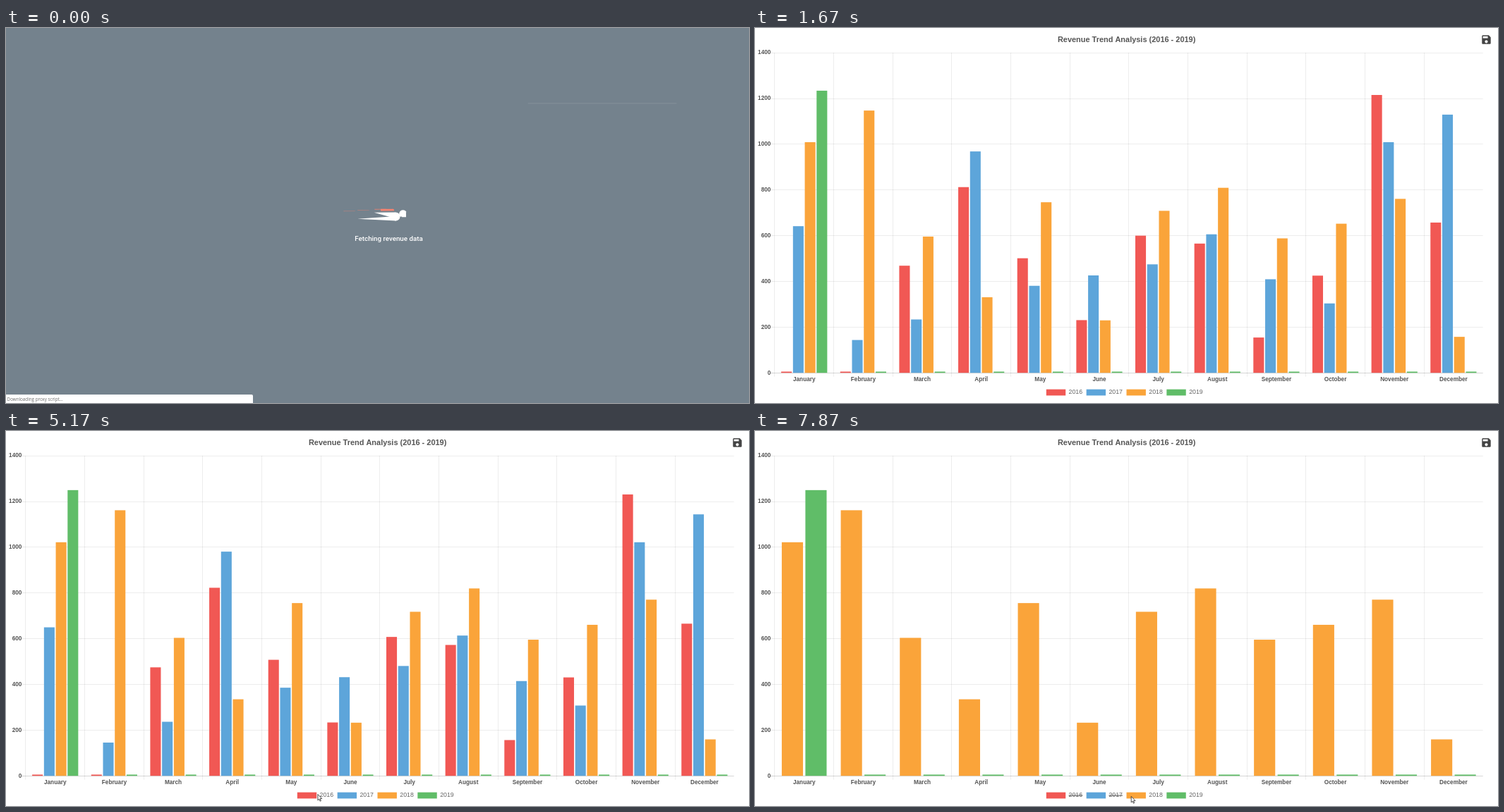
Recreate the animation shown at these times as an HTML page with a canvas. Size 1053 by 532 pixels, loop 8 s.

```html
<!DOCTYPE html>
<html lang="en">
<head>
<meta charset="utf-8">
<title>Revenue Trend Analysis</title>
<style>
html, body { margin: 0; width: 100%; height: 100%; overflow: hidden; background: #fff; }
canvas { position: absolute; left: 0; top: 0; }
</style>
</head>
<body>
<canvas id="page" width="1053" height="532"></canvas>
<canvas id="loader" width="1053" height="532"></canvas>
<script>
const page = document.getElementById('page').getContext('2d');
const loader = document.getElementById('loader').getContext('2d');
const W = 1053, H = 532, LOOP = 8000;
const UNIT = W / 1920;      // the page is drawn at this zoom
const DURATION = 730, HOVER = 290;
const CHART_START = 1185, FADE_START = 1228, FADE_TIME = 350, STATUS_END = 1000;

const LEFT = 27.9, RIGHT = 1031.7, TOP = 35.2, BASE = 489.4;
const CELL = (RIGHT - LEFT) / 12;
const SANS = '"Liberation Sans", Arial, sans-serif';
const FONT = {
  title: `bold ${20 * UNIT}px ${SANS}`,
  axis: `bold ${15 * UNIT}px ${SANS}`,
  legend: `${16 * UNIT}px ${SANS}`,
  tip: `bold ${13 * UNIT}px ${SANS}`,
  loading: `500 ${17.8 * UNIT}px Roboto, sans-serif`,
  status: '6.25px "Open Sans", sans-serif'
};
const MONTHS = ['January', 'February', 'March', 'April', 'May', 'June', 'July',
  'August', 'September', 'October', 'November', 'December'];
const SERIES = [
  { year: 2016, color: '#f15854', hover: 'hsl(2,100%,57%)',
    data: [0, 0, 475, 823, 508, 234, 608, 573, 157, 431, 1231, 666] },
  { year: 2017, color: '#5da5da', hover: 'hsl(205,94%,55%)',
    data: [650, 146, 237, 981, 386, 432, 481, 614, 415, 308, 1022, 1144] },
  { year: 2018, color: '#faa43a', hover: 'hsl(33,100%,54%)',
    data: [1022, 1162, 604, 335.37, 756, 233, 718, 820, 596, 661, 771, 160] },
  { year: 2019, color: '#60bd68', hover: 'hsl(125,62%,50%)', data: [1250] }
];

// Years shown from each time onwards
const STEPS = [
  { t: CHART_START, years: [2016, 2017, 2018, 2019] },
  { t: 5390, years: [2017, 2018, 2019] },
  { t: 5919, years: [2018, 2019] },
  { t: 6604, years: [2018] },
  { t: 7150, years: [2018, 2019] }
];

// Pointer key points: time, x, y
const PATH = [
  [1960, 126, -12], [2330, 112, 150], [2530, 112, 150], [3330, 60, 225],
  [3560, 40, 410], [4020, 321.6, 439], [4180, 338.5, 438.5], [4220, 338.5, 438.5],
  [4450, 372, 461], [5030, 441.5, 506], [5170, 441.5, 515], [5420, 441.5, 515],
  [5800, 496.3, 518.7], [6240, 496.3, 518.7], [6500, 599.3, 517],
  [7250, 599.3, 517], [7700, 532.8, 518]
];

const clamp = v => Math.max(0, Math.min(1, v));
const lerp = (a, b, p) => a + (b - a) * p;
const mix = (a, b, p) => a.map((v, i) => lerp(v, b[i], p));
const easeOut = p => 1 - Math.pow(1 - clamp(p), 4);
const value = (s, m) => SERIES[s].data[m] || 0;
const axisMax = step => Math.ceil(
  Math.max(...SERIES.filter(s => STEPS[step].years.includes(s.year)).flatMap(s => s.data)) / 200) * 200;

function text(ctx, str, x, y, font, color, align = 'left', base = 'middle') {
  ctx.font = font;
  ctx.fillStyle = color;
  ctx.textAlign = align;
  ctx.textBaseline = base;
  ctx.fillText(str, x, y);
}

function polygon(ctx, points) {
  ctx.beginPath();
  points.forEach(([x, y]) => ctx.lineTo(x, y));
  ctx.closePath();
  ctx.fill();
}

function roundRect(ctx, x, y, w, h, r) {
  ctx.beginPath();
  ctx.roundRect(x, y, w, h, r);
  ctx.fill();
}

// Column of a series inside a month cell: [left, width, pixels per unit]
function target(step, s) {
  const { years } = STEPS[step];
  const slot = CELL * 0.8 / years.length;
  const index = years.filter(y => y <= SERIES[s].year).length - 1;
  return [CELL * 0.1 + slot * (index + 0.05), slot * 0.9, (BASE - TOP) / axisMax(step)];
}

function column(step, s, t) {
  const end = target(step, s);
  const from = step ? column(step - 1, s, STEPS[step].t) : [end[0], end[1], 0];
  return mix(from, end, easeOut((t - STEPS[step].t) / DURATION));
}

// Empty bars still show a thin foot
const barHeight = (v, scale) => Math.max(v, 6) * scale;

function pointer(t) {
  const i = PATH.findIndex(p => p[0] > t);
  if (i === 0) return null;
  if (i < 0) return PATH[PATH.length - 1].slice(1);
  const a = PATH[i - 1], b = PATH[i];
  return mix(a, b, (t - a[0]) / (b[0] - a[0])).slice(1);
}

// Bar under the pointer, or null
function hit(t) {
  const p = pointer(t);
  if (!p || p[0] < LEFT || p[1] > BASE) return null;
  const m = Math.floor((p[0] - LEFT) / CELL);
  for (let s = 0; s < SERIES.length; s++) {
    const [x, w, scale] = target(0, s);
    const left = LEFT + m * CELL + x, top = BASE - barHeight(value(s, m), scale);
    if (p[0] >= left && p[0] <= left + w && p[1] >= top) return { s, m, x: left + w / 2, y: top };
  }
  return null;
}

const same = (a, b) => a === b || a && b && a.s === b.s && a.m === b.m;
const hovers = [];
for (let t = PATH[0][0], last = null; t < STEPS[1].t; t += 2) {
  const bar = hit(t);
  if (!same(bar, last)) hovers.push({ t, bar });
  last = bar;
}

// Tooltip anchor and opacity, eased from one hover to the next
function tooltip(t) {
  let view = [0, 0, 0], bar = null;
  hovers.filter(h => h.t <= t).forEach((h, i) => {
    bar = h.bar || bar;
    if (view[2] < 0.01) view = [bar.x, bar.y, 0];
    const end = Math.min(t, hovers[i + 1] ? hovers[i + 1].t : t);
    view = mix(view, [bar.x, bar.y, h.bar ? 1 : 0], easeOut((end - h.t) / HOVER));
  });
  return { bar, x: view[0], y: view[1], alpha: view[2] };
}

function drawTooltip(ctx, t) {
  const tip = tooltip(t);
  if (tip.alpha < 0.01) return;
  const { s, m } = tip.bar;
  const title = `${MONTHS[m]} ${SERIES[s].year}`, body = '$' + value(s, m).toFixed(2);
  const measure = (str, font) => { ctx.font = font; return ctx.measureText(str).width; };
  const width = Math.max(measure(title, FONT.tip), measure(body, FONT.legend)) + 12 * UNIT;
  const x = tip.x + 7 * UNIT, y = tip.y - 12.9;
  ctx.save();
  ctx.globalAlpha = tip.alpha;
  ctx.fillStyle = 'rgba(0,0,0,.8)';
  roundRect(ctx, x, y, width, 25.8, 3.3);
  polygon(ctx, [[x, tip.y - 2.7], [x - 2.7, tip.y], [x, tip.y + 2.7]]);
  text(ctx, title, x + 3.3, y + 6.9, FONT.tip, '#fff');
  text(ctx, body, x + 3.3, y + 18, FONT.legend, '#fff');
  ctx.restore();
}

function drawAxes(ctx, max) {
  const grid = (x, y, w, h, alpha) => {
    ctx.fillStyle = `rgba(0,0,0,${alpha})`;
    ctx.fillRect(Math.floor(x), Math.floor(y), w, h);
  };
  for (let v = 0; v <= max; v += 200) {
    const y = lerp(BASE, TOP, v / max);
    grid(22.5, y, RIGHT - 22, 1, v ? 0.07 : 0.16);
    text(ctx, v, 22.4, y, FONT.axis, '#555', 'right');
  }
  MONTHS.forEach((name, i) => {
    const x = LEFT + i * CELL;
    grid(x, TOP, 1, BASE - TOP + 5.5, 0.07);
    text(ctx, name, x + CELL / 2, 498.6, FONT.axis, '#555', 'center');
  });
}

function drawLegend(ctx, years) {
  SERIES.forEach((s, i) => {
    const x = 412.8 + i * 56.85;
    ctx.fillStyle = s.color;
    ctx.fillRect(x, 512.6, 27.4, 8.8);
    text(ctx, s.year, x + 31.8, 517, FONT.legend, '#666');
    if (!years.includes(s.year)) ctx.fillRect(x + 31.8, 516.5, 19.5, 1.1);
  });
}

function drawBars(ctx, step, t) {
  const hovered = hit(t);
  ctx.save();
  ctx.beginPath();
  ctx.rect(LEFT, TOP, RIGHT - LEFT, BASE - TOP);
  ctx.clip();
  SERIES.forEach(({ year, color, hover }, s) => {
    if (!STEPS[step].years.includes(year)) return;
    const [x, w, scale] = column(step, s, t);
    MONTHS.forEach((_, m) => {
      const h = barHeight(value(s, m), scale);
      ctx.fillStyle = same(hovered, { s, m }) ? hover : color;
      ctx.fillRect(LEFT + m * CELL + x, BASE - h, w, h);
    });
  });
  ctx.restore();
}

const saveIcon = new Path2D('M17 3H5c-1.11 0-2 .9-2 2v14c0 1.1.89 2 2 2h14c1.1 0 2-.9 2-2V7l-4-4z' +
  'm-5 16c-1.66 0-3-1.34-3-3s1.34-3 3-3 3 1.34 3 3-1.34 3-3 3zm3-10H5V5h10v4z');
const arrow = new Path2D('M.4 .4V8.9L2.3 7.2 3.6 10.2 4.9 9.6 3.6 6.7 6.2 6.5z');

function drawChart(ctx, t) {
  const step = STEPS.filter(s => s.t <= t).length - 1;
  text(ctx, 'Revenue Trend Analysis (2016 - 2019)', 526.6, 17, FONT.title, '#555', 'center');
  ctx.save();
  ctx.translate(1028.2, 8.3);
  ctx.scale(0.69, 0.69);
  ctx.fillStyle = '#444';
  ctx.fill(saveIcon, 'evenodd');
  ctx.restore();
  drawAxes(ctx, axisMax(step));
  drawBars(ctx, step, t);
  drawLegend(ctx, STEPS[step].years);
  drawTooltip(ctx, t);
}

function drawPointer(ctx, t) {
  const p = pointer(t);
  if (!p) return;
  ctx.save();
  ctx.translate(p[0], p[1]);
  ctx.fillStyle = '#fff';
  ctx.fill(arrow);
  ctx.strokeStyle = '#222';
  ctx.lineWidth = 0.8;
  ctx.stroke(arrow);
  ctx.restore();
}

// Thin lines that slip back from the pack and fade
function drawExhaust(ctx, sec) {
  [[0.2, 80], [0.4, 100], [1, 150]].forEach(([period, travel], i) => {
    const q = (sec + 0.638) / period % 1;
    ctx.globalAlpha = 1 - q;
    ctx.fillRect(60 - travel * q, -19 + i * 2, 30, 1.5);
  });
  ctx.globalAlpha = 1;
}

function drawFlyer(ctx, sec) {
  const turn = Math.PI * 2 * (sec + 0.19) / 0.4, tilt = 40 * Math.PI / 180;
  ctx.save();
  ctx.translate(W / 2, H / 2);
  ctx.scale(UNIT, UNIT);
  ctx.translate(1.7 * Math.cos(turn) - 50, 1.2 - 0.8 * Math.cos(turn) + 1.5 * Math.sin(turn * 3));
  ctx.rotate(-0.012 * Math.sin(turn * 5));
  ctx.fillStyle = '#f8826f';
  roundRect(ctx, 60, -19, 35, 5, [2, 10, 1, 0]);
  drawExhaust(ctx, sec);
  ctx.fillStyle = '#fff';
  polygon(ctx, [[0, 6], [100, 0], [100, 12]]);
  polygon(ctx, [[43, -10], [98, -10], [98, 6]]);
  roundRect(ctx, 88, -10, 22, 22, 11);
  ctx.translate(115, -9);
  ctx.rotate(-tilt);
  roundRect(ctx, -10, -6, 20, 12, [10, 10, 0, 0]);
  ctx.translate(0, 7);
  ctx.rotate(tilt);
  roundRect(ctx, -6, -6, 12, 12, [0, 0, 0, 2]);
  ctx.restore();
}

function drawLoader(ctx, t) {
  const sec = t / 1000 * 1.427;
  ctx.clearRect(0, 0, W, H);
  ctx.canvas.style.opacity = 1 - clamp((t - FADE_START) / FADE_TIME);
  ctx.fillStyle = 'rgba(50,70,86,.673)';
  ctx.fillRect(0, 0, W, H);
  for (let i = 0; i < 4; i++) {
    const q = (sec / 0.6 + 0.322 + i / 4) % 1;
    ctx.fillStyle = `rgba(255,255,255,${0.16 * (1 - q)})`;
    ctx.fillRect(W * (2 - 4 * q), H * 0.2 * (i + 1), W * 0.2, 2 * UNIT);
  }
  drawFlyer(ctx, sec);
  text(ctx, 'Fetching revenue data', 494.3, 302, FONT.loading, '#fff', 'left', 'alphabetic');
  if (t < STATUS_END) {
    roundRect(ctx, -2, 520, 352, 14, [0, 2, 0, 0]);
    text(ctx, 'Downloading proxy script...', 1.6, 528.8, FONT.status, '#6c6c6c', 'left', 'alphabetic');
  }
}

function draw(t) {
  page.fillStyle = '#fff';
  page.fillRect(0, 0, W, H);
  if (t >= CHART_START) drawChart(page, t);
  drawPointer(page, t);
  drawLoader(loader, t);
}

const start = performance.now();
function tick() {
  draw((performance.now() - start) % LOOP);
  requestAnimationFrame(tick);
}
tick();
</script>
</body>
</html>
```
